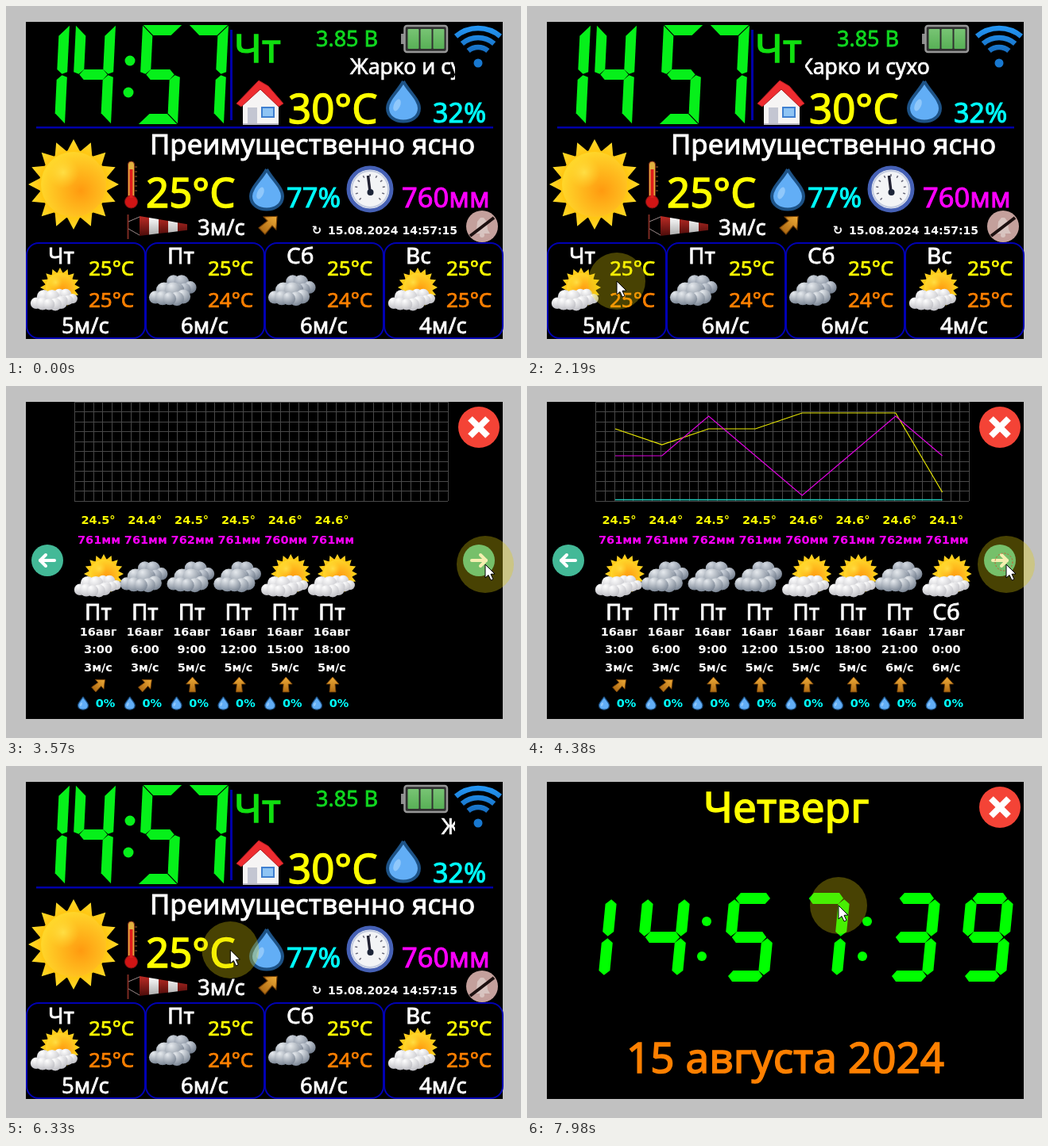
Write an HTML page with a canvas that moves like this. It is 648 by 444 pixels and loops after 8 s.

```html
<!DOCTYPE html>
<html lang="ru">
<head>
<meta charset="utf-8">
<title>Метеостанция</title>
<style>
html, body { margin: 0; width: 648px; height: 444px; overflow: hidden; background: #c1c1c1; }
canvas { display: block; }
</style>
</head>
<body>
<canvas id="stage" width="648" height="444"></canvas>
<script>
const c = document.getElementById('stage').getContext('2d');
const LOOP = 8000, TAU = Math.PI * 2;
const YELLOW = '#ffff00', ORANGE = '#ff8000', CYAN = '#00ffff', MAGENTA = '#ff00ff', GREEN = '#00ff00';
const clamp = (v, a, b) => Math.min(b, Math.max(a, v));

// ---------- helpers ----------
// regular weight with a thin outline gives a medium weight
function text(s, x, y, size, color = '#fff', align = 'left') {
  c.font = `${size}px "Noto Sans", "Open Sans", sans-serif`;
  c.textAlign = align;
  c.fillStyle = c.strokeStyle = color;
  c.lineWidth = size * 0.028;
  c.fillText(s, x, y);
  c.strokeText(s, x, y);
}
function small(s, x, y, size, color = '#fff', align = 'center') {
  c.font = `bold ${size}px "DejaVu Sans", sans-serif`;
  c.textAlign = align;
  c.fillStyle = color;
  c.fillText(s, x, y);
}
function rect(x, y, w, h, fill) { c.fillStyle = fill; c.fillRect(x, y, w, h); }
function round(x, y, w, h, r, fill, stroke, lw = 1) {
  c.beginPath(); c.roundRect(x, y, w, h, r);
  paint(fill, stroke, lw);
}
function disk(x, y, r, fill, stroke, lw = 1) {
  c.beginPath(); c.arc(x, y, r, 0, TAU);
  paint(fill, stroke, lw);
}
function poly(p, fill, stroke, lw = 1) {
  c.beginPath();
  for (let i = 0; i < p.length; i += 2) c.lineTo(p[i], p[i + 1]);
  c.closePath();
  paint(fill, stroke, lw);
}
function line(p, color, lw = 1) {
  c.beginPath();
  for (let i = 0; i < p.length; i += 2) c.lineTo(p[i], p[i + 1]);
  paint(null, color, lw);
}
function paint(fill, stroke, lw) {
  if (fill) { c.fillStyle = fill; c.fill(); }
  if (stroke) { c.strokeStyle = stroke; c.lineWidth = lw; c.stroke(); }
}
function at(x, y, scale, draw, turn = 0) {
  c.save(); c.translate(x, y); c.rotate(turn); c.scale(scale, scale);
  draw(); c.restore();
}
function shade(y0, y1, a, b) {
  const g = c.createLinearGradient(0, y0, 0, y1);
  g.addColorStop(0, a); g.addColorStop(1, b);
  return g;
}
function glow(x, y, r, a, b) {
  const g = c.createRadialGradient(x, y, 0, x, y, r);
  g.addColorStop(0, a); g.addColorStop(1, b);
  return g;
}

// ---------- seven-segment digits ----------
const SEGS = ['abcdef', 'bc', 'abged', 'abgcd', 'fgbc', 'afgcd', 'afgedc', 'abc', 'abcdefg', 'abcdfg'];

// sharp: trapezoids that fill the cell; otherwise hexagons between nodes
function segment(id, W, H, T, sharp) {
  const M = H / 2, h = T / 2, g = sharp ? 0.8 : 1.3;
  if (id === 'g' || !sharp) {
    const L = h, R = W - h;
    const [x0, y0, x1, y1] = {
      a: [L, h, R, h], g: [L, M, R, M], d: [L, H - h, R, H - h],
      f: [L, h, L, M], b: [R, h, R, M], e: [L, M, L, H - h], c: [R, M, R, H - h]
    }[id];
    return y0 === y1
      ? [x0 + g, y0, x0 + h, y0 - h, x1 - h, y0 - h, x1 - g, y0, x1 - h, y0 + h, x0 + h, y0 + h]
      : [x0, y0 + g, x0 + h, y0 + h, x0 + h, y1 - h, x0, y1 - g, x0 - h, y1 - h, x0 - h, y0 + h];
  }
  const p = 'ad'.includes(id)
    ? [g, 0, W - g, 0, W - T - g, T, T + g, T]
    : [0, g, 0, M - h / 2, h, M - g, T, M - h, T, T + g];
  return p.map((v, i) => i % 2
    ? ('dec'.includes(id) ? H - v : v)
    : ('bc'.includes(id) ? W - v : v));
}
function digit(n, right, top, W, H, T, slant, sharp) {
  c.save();
  c.transform(1, 0, -slant / H, 1, right - W, top);
  for (const id of SEGS[n]) poly(segment(id, W, H, T, sharp), sharp ? '#06f01a' : GREEN);
  c.restore();
}

// ---------- icons ----------
function sun(x, y, r) {
  at(x, y, r / 57, () => {
    for (let i = 0; i < 16; i++) {
      c.save(); c.rotate(i * TAU / 16);
      poly([-10, -38, 0, -57, 10, -38], shade(-57, -38, '#ffdc28', '#ffc010'));
      c.restore();
    }
    disk(0, 0, 43, '#ffc814');
    disk(0, 0, 41, glow(9, 8, 50, '#ff9a10', '#ffd62a'));
    disk(-13, -15, 20, glow(-13, -15, 20, 'rgba(255,232,80,.75)', 'rgba(255,220,50,0)'));
  });
}
const CLOUD = [[-8, -4, 11], [5, -3, 12], [-20, 6, 9], [19, 5, 10], [-10, 7, 10], [10, 8, 10], [0, 8, 9]];
function cloud(x, y, k, light, dark) {
  at(x, y, k, () => CLOUD.forEach(([px, py, r]) => disk(px, py, r, glow(px - 3, py - r * 0.6, r * 1.7, light, dark))));
}
function cloudy(x, y) {
  cloud(x + 7, y - 7, 0.78, '#d3d9e1', '#6d7888');
  cloud(x - 4, y + 4, 0.9, '#e6eaee', '#75808f');
}
function partly(x, y) {
  sun(x + 8, y - 3, 25);
  cloud(x + 12, y + 8, 0.62, '#ffffff', '#bcbcc2');
  cloud(x - 6, y + 12, 0.8, '#ffffff', '#bcbcc2');
}
const SKY = { s: (x, y) => sun(x, y, 29), p: partly, c: cloudy };

function drop(x, y, k) {
  at(x, y, k, () => {
    c.beginPath(); c.moveTo(0, -25);
    c.bezierCurveTo(7, -12, 20, -2, 20, 9);
    c.bezierCurveTo(20, 31, -20, 31, -20, 9);
    c.bezierCurveTo(-20, -2, -7, -12, 0, -25);
    paint('#62aef6', '#1d5286', 4);
    c.beginPath(); c.ellipse(-8, 5, 4, 8, 0.4, 0, TAU);
    paint('rgba(190,225,255,.5)');
  });
}
function windArrow(x, y, turn, k = 1) {
  at(x, y, k, () => poly([0, -10, 8, -1, 3, -1, 4, 9, -4, 9, -3, -1, -8, -1],
    shade(-10, 9, '#f0ac38', '#b06c14'), '#7a4408', 0.8), turn);
}
function house() {
  poly([298, 124, 320, 102, 343, 124, 343, 149, 298, 149], '#f6f4f4');
  poly([290, 123, 318, 94, 330, 101, 349, 123, 343, 127, 320, 105, 296, 127], '#ee2c30', '#b01c20', 1);
  rect(304, 128, 12, 21, '#c4c6d2');
  rect(321, 127, 17, 14, '#3f7fd0');
  rect(323, 129, 13, 10, '#8fc4f4');
  line([298, 149, 343, 149], '#b8b8c0', 2);
}
function battery() {
  rect(497, 35, 6, 13, '#8d8d8d');
  round(501.5, 25, 53.5, 33, 3, '#303030', '#979797', 2.5);
  for (let i = 0; i < 3; i++) round(505.5 + i * 16, 29, 14, 25, 1, shade(29, 54, '#78c474', '#58b056'));
}
function wifi() {
  c.lineCap = 'butt';
  [19, 31, 43].forEach(r => {
    c.beginPath(); c.arc(594, 71, r, -Math.PI * 0.725, -Math.PI * 0.275);
    paint(null, shade(26, 66, '#2496f4', '#1464b4'), 6.5);
  });
  disk(594, 72, 5.5, '#1878d0');
}
function thermometer() {
  round(153.5, 196, 8, 48, 4, '#e0b040', '#8a3018', 1);
  disk(157.5, 247, 8, '#d01414', '#7c1414', 1);
  rect(155.5, 206, 4, 36, '#e01c1c');
  for (let y = 203; y < 238; y += 6) line([162, y, 165, y], '#a06030', 1);
}
function windsock() {
  line([153.5, 263, 153.5, 294], '#7a2a22', 2);
  line([154, 272, 168, 266], '#988', 1);
  line([154, 281, 168, 289], '#988', 1);
  const top = x => 265 + (x - 168) * 0.17, bottom = x => 290 - (x - 168) * 0.12;
  for (let i = 0; i < 5; i++) {
    const a = 168 + i * 12, b = a + 12;
    poly([a, top(a), b, top(b), b, bottom(b), a, bottom(a)],
      i % 2 ? shade(266, 290, '#ffffff', '#a8a8a8') : shade(266, 290, '#b82a24', '#4c0c0a'));
  }
}
function gauge() {
  disk(458, 231, 27, '#f3f4f6', '#4560b4', 5);
  disk(458, 231, 23, null, '#c4cce0', 2);
  for (let i = 0; i < 11; i++) {
    const a = Math.PI * (0.75 + i * 0.15), x = Math.cos(a), y = Math.sin(a);
    line([458 + x * 16, 231 + y * 16, 458 + x * 19, 231 + y * 19], '#667', 1.5);
  }
  line([455.5, 214, 458.5, 238], '#223', 3.5);
  disk(458.5, 235, 4, '#1c2438');
}
function mutedBell() {
  disk(599, 278, 20, '#c4a09c');
  poly([589, 287, 592, 282, 593, 272, 597, 267, 601, 267, 605, 272, 606, 282, 609, 287], '#d8c4c0');
  disk(599, 289, 3, '#d8c4c0');
  line([584, 290, 614, 267], '#1c1010', 4);
}
function closeButton() {
  disk(595, 52, 26, '#f44336');
  c.lineCap = 'butt';
  line([584, 41, 606, 63], '#fff', 8);
  line([606, 41, 584, 63], '#fff', 8);
}
function arrowButton(x, dir) {
  disk(x, 220, 20, '#43b997');
  at(x, 220, 1, () => {
    c.scale(dir, 1); c.lineCap = c.lineJoin = 'round';
    line([-9, 0, 9, 0], '#fff', 4);
    line([2, -7, 9, 0, 2, 7], '#fff', 4);
  });
}

// ---------- main screen ----------
const DAYS = [['Чт', 25, 25, 5, 'p'], ['Пт', 25, 24, 6, 'c'], ['Сб', 25, 24, 6, 'c'], ['Вс', 25, 25, 4, 'p']];

function bigTime(colon) {
  [1, 4, 5, 7].forEach((n, i) => digit(n, [80, 138, 222, 280][i], 24, 50, 125, 13, 6, true));
  if (colon) { disk(156, 69, 6.5, '#06f01a'); disk(154, 109, 6.5, '#06f01a'); }
}
function ticker(x) {
  c.save();
  c.beginPath(); c.rect(350, 60, 215, 34); c.clip();
  text('Жарко и сухо', Math.round(x), 86, 26.5);
  c.restore();
}
function indoor() {
  rect(282, 30, 3, 114, '#0000a8');
  rect(38, 152, 575, 2.5, '#0000a8');
  text('Чт', 287, 71, 50, '#10e010');
  text('3.85 В', 390, 51, 27, '#10d820');
  battery(); wifi(); house();
  text('30°C', 355, 148, 51, YELLOW);
  drop(500, 120, 1);
  text('32%', 537, 147, 34, CYAN);
}
function outdoor() {
  text('Преимущественно ясно', 181, 187, 34.7);
  sun(85, 225, 57);
  thermometer();
  text('25°C', 176, 254, 51, YELLOW);
  drop(328, 231, 1);
  text('77%', 353, 254, 34.5, CYAN);
  gauge();
  text('760мм', 498, 254, 34.5, MAGENTA);
}
function extras() {
  windsock();
  text('3м/с', 241, 289, 27.5);
  windArrow(331, 275, 0.8, 1.4);
  small('↻', 391, 288, 15);
  small('15.08.2024 14:57:15', 405, 288, 14, '#fff', 'left');
  mutedBell();
}
function dayPanel(i) {
  const [name, hi, lo, wind, sky] = DAYS[i], x = 25 + i * 150;
  round(x + 1, 299, 149, 120, 15, null, '#0000b4', 2);
  text(name, x + 28, 325, 28);
  SKY[sky](x + 35, 358);
  text(hi + '°C', x + 79, 340, 26, YELLOW);
  text(lo + '°C', x + 79, 380, 26, ORANGE);
  text(wind + 'м/с', x + 45, 413, 27.5);
}
function mainScreen(colon, tickX, steps) {
  const parts = [() => bigTime(colon), indoor, outdoor, extras, ...DAYS.map((d, i) => () => dayPanel(i))];
  parts.slice(0, steps).forEach(f => f());
  ticker(tickX);
}

// ---------- forecast screen ----------
// one entry per three hours; pressure is counted from 760
const TEMP = [24.9, 25, 24.5, 24.5, 24.5, 24.4, 24.5, 24.5, 24.6, 24.6, 24.6, 24.1, 24.1, 24.2, 24.3, 25];
const PRES = [0, 1, 1, 2, 1, 1, 2, 1, 0, 1, 2, 1, 1, 2, 3, 2];
const WIND = '3453335555665653';
const ICON = 'sppppcccppcpcppc';
const SLANTED = '1100110000000000';
// first entry, start, time to fill columns, graph start, graph heights
const PAGES = [
  { from: 0, start: 2340, fill: 260, graph: 3050, th: 100, ph: 100 },
  { from: 4, start: 3480, fill: 130, graph: 3640, th: 100, ph: 100 },
  { from: 8, start: 4410, fill: 100, graph: 4520, th: 90, ph: 97 }
];

function column(i, k) {
  const x = 116 + i * 58.8, hour = 15 + k * 3, day = Math.floor(hour / 24);
  small(TEMP[k].toFixed(1) + '°', x, 174, 14.5, YELLOW);
  small(760 + PRES[k] + 'мм', x + 1, 199, 14.5, MAGENTA);
  SKY[ICON[k]](x - 1, 240);
  text(['Чт', 'Пт', 'Сб'][day], x, 295, 28, '#fff', 'center');
  small(15 + day + 'авг', x, 315, 14.5);
  small(hour % 24 + ':00', x, 337, 14.5);
  small(WIND[k] + 'м/с', x, 360, 14.5);
  windArrow(x + 1, 377, SLANTED[k] === '1' ? 0.85 : 0);
  drop(x - 19, 400, 0.32);
  small('0%', x + 9, 405, 14.5, CYAN);
}
function curve(values, base, height, color, part) {
  const lo = Math.min(...values), k = height / (Math.max(...values) - lo);
  const pts = values.flatMap((v, i) => [111 + i * 58.8, base - (v - lo) * k]);
  line(pts.slice(0, 2 * Math.ceil(part * values.length)), color, 1.2);
}
function forecast(page, t) {
  const p = PAGES[page];
  c.beginPath();
  for (let x = 0; x <= 40; x++) { const q = Math.round(86 + x * 11.75) + 0.5; c.moveTo(q, 20); c.lineTo(q, 145); }
  for (let y = 0; y <= 10; y++) { const q = Math.round(20 + y * 12.45) + 0.5; c.moveTo(86, q); c.lineTo(556, q); }
  paint(null, '#484848', 1);
  closeButton();
  arrowButton(595, 1);
  if (page) arrowButton(52, -1);
  const n = clamp(Math.ceil((t - p.start) / p.fill * 8), 0, 8);
  for (let i = 0; i < n; i++) column(i, p.from + i);
  const part = clamp((t - p.graph) / 70, 0, 1);
  if (part > 0) {
    curve(TEMP.slice(p.from, p.from + 8), 134, p.th, '#e8e800', part);
    curve(PRES.slice(p.from, p.from + 8), 138, p.ph, '#e000e0', part);
    line([111, 143.5, 111 + 411.6 * part, 143.5], '#20c8b8', 1.6);
  }
}

// ---------- clock screen ----------
function clockScreen(t) {
  const sec = 39 + Math.floor((t - 7480) / 1000);
  text('Четверг', 222, 71, 53, YELLOW);
  closeButton();
  [...('1457' + sec)].forEach((n, i) => digit(+n, [114, 206, 315, 407, 521, 613][i], 160, 60, 112, 14, 11));
  for (const x of [0, 202]) { disk(226 + x, 196, 6, GREEN); disk(220 + x, 240, 6, GREEN); }
  text('15 августа 2024', 125, 387, 53, ORANGE);
}

// ---------- pointer ----------
const PATH = [
  [1860, 70, 490], [2150, 113, 347], [2660, 113, 347], [2970, 503, 235], [3180, 612, 228], [3300, 603, 225],
  [5010, 603, 225], [5340, 600, 53], [5840, 600, 53], [6330, 283, 232], [6600, 92, 228], [6820, 130, 100],
  [7050, 130, 100], [7440, 320, 255], [7720, 400, 215], [7980, 392, 176]
];
const CLICKS = [2240, 3400, 4350, 5400, 6840];

// monotone cubic through the path points
function along(t, axis) {
  const n = PATH.length;
  const rate = i => i < 0 || i > n - 2 ? 0 : (PATH[i + 1][axis] - PATH[i][axis]) / (PATH[i + 1][0] - PATH[i][0]);
  const slope = i => { const a = rate(i - 1), b = rate(i); return a * b <= 0 ? 0 : 2 * a * b / (a + b); };
  let i = 0;
  while (i < n - 2 && t >= PATH[i + 1][0]) i++;
  const d = PATH[i + 1][0] - PATH[i][0], u = clamp((t - PATH[i][0]) / d, 0, 1), v = 1 - u;
  return PATH[i][axis] * (1 + 2 * u) * v * v + PATH[i + 1][axis] * u * u * (3 - 2 * u)
    + d * (slope(i) * u * v * v - slope(i + 1) * u * u * v);
}
function pointer(t) {
  if (t < PATH[0][0]) return;
  const x = along(t, 1), y = along(t, 2);
  disk(x, y, 36, 'rgba(225,205,10,.32)');
  if (CLICKS.some(k => t >= k && t < k + 70)) {
    c.setLineDash([2, 2]);
    disk(x - 3, y - 3, 11, null, '#d05030', 1);
    c.setLineDash([]);
  }
  at(x, y, 1, () => poly([0, 0, 0, 17, 4, 13.5, 7, 20, 10, 18.7, 7, 12.3, 12, 12], '#fff', '#000', 1));
}

// ---------- timeline ----------
function render(t) {
  c.lineCap = 'butt'; c.lineJoin = 'miter'; c.miterLimit = 3;
  rect(0, 0, 648, 444, '#c1c1c1');
  rect(25, 20, 600, 400, '#000');
  if (t < 2310) {
    const colon = t < 30 || (t + 630) % 1000 < 500;
    mainScreen(colon, 433 - t * 0.0439, 8);
  } else if (t < 5440) {
    forecast(t < 3470 ? 0 : t < 4410 ? 1 : 2, t);
  } else if (t < 6900) {
    const colon = (t - 5100) % 1000 < 500;
    mainScreen(colon, 565 - Math.max(0, t - 5950) * 0.0439, Math.floor((t - 5440) / 35));
  } else clockScreen(t);
  pointer(t);
}
const begin = performance.now();
function tick() {
  render((performance.now() - begin) % LOOP);
  requestAnimationFrame(tick);
}
tick();
</script>
</body>
</html>
```
